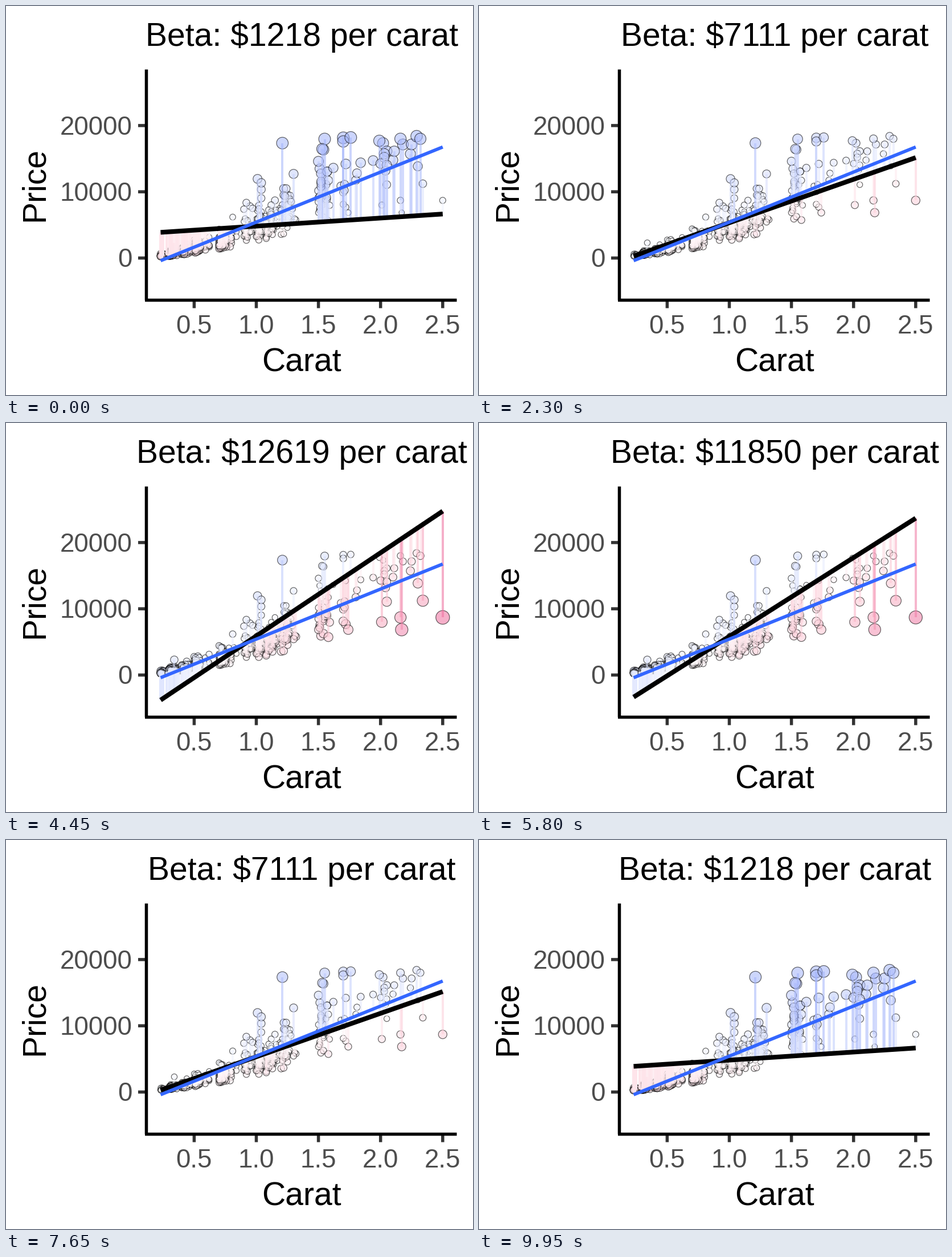
These frames come from a looping animation (820x683 px, 10 s). A matplotlib script:

```python
import matplotlib.pyplot as plt
import numpy as np
from matplotlib.animation import FuncAnimation
from matplotlib.collections import LineCollection
from matplotlib.colors import LinearSegmentedColormap

W, H, DPI = 820, 683, 64
PT = 72 / DPI                      # points per pixel
BIG, SMALL = 57.1, 45.7            # text heights in pixels
HALF = 100                         # frames in one sweep of the slope
BETA_MIN, BETA_STEP = 1218, 128.1
STATES = 20                        # slopes the chart actually shows
PIVOT = (0.905, 4700)
BEST = 7559
ENDS = np.array([0.23, 2.5])
COUNT = 760
REACH = 18000                      # residual with the strongest colour

plt.rcParams["font.family"] = "Liberation Sans"
shades = LinearSegmentedColormap.from_list(
    "residual", ["#ea5a92", "#fcbccb", "white", "#bcc9fc", "#7a92fa"])


def px(carat):
    return 221.3 + 218.2 * carat


def py(price):
    return 442.5 - 0.01163 * price


def predict(carat, beta):
    return PIVOT[1] + beta * (carat - PIVOT[0])


def make_data():
    """Stones bunch just above popular sizes; price grows as a power of size."""
    rng = np.random.default_rng(8)
    sizes = np.array([0.23, 0.3, 0.4, 0.5, 0.7, 0.9, 1.0, 1.1, 1.2, 1.5, 1.7, 2.0])
    share = np.array([6, 25, 11, 11, 14, 5, 11, 5, 4, 6.5, 1, 2.2])
    base = rng.choice(sizes, COUNT, p=share / share.sum())
    carat = base + rng.exponential(0.01 + 0.035 * base)
    carat = np.minimum(carat, base + 0.07 + 0.1 * base).round(2)
    factor = np.exp(rng.normal(0, 0.26, COUNT)).clip(0.56, 2.1)
    price = 4600 * carat ** 1.75 * factor
    price = np.where(price > 18000, rng.uniform(14500, 18000, COUNT), price)

    # stones that stand apart from the crowd
    apart = np.array([
        (0.34, 2300), (0.97, 7500), (1.01, 11950), (1.04, 11350), (1.21, 17350),
        (1.30, 12700), (1.50, 14600), (1.62, 13600), (1.70, 18150), (1.70, 17600),
        (1.74, 6850), (1.76, 18200), (1.81, 12800), (1.99, 17700), (2.01, 8000),
        (2.16, 18000), (2.16, 8700), (2.17, 6850), (2.25, 17150), (2.29, 18400),
        (2.32, 18000), (2.30, 13850), (2.34, 11220), (2.50, 8700)])
    return np.append(carat, apart[:, 0]), np.append(price, apart[:, 1])


def residual_colors(res, alpha):
    rgba = shades(0.5 + res / (2 * REACH))
    rgba[:, 3] = alpha
    return rgba


fig = plt.figure(figsize=(W / DPI, H / DPI), dpi=DPI, facecolor="white")
ax = fig.add_axes([0, 0, 1, 1])
ax.set_xlim(0, W)
ax.set_ylim(H, 0)
ax.axis("off")


def stroke(x, y, width, color, z):
    line, = ax.plot(x, y, color=color, lw=width * PT, zorder=z,
                    solid_capstyle="butt", snap=False)
    return line


def label(x, y, text, size, color="black", **kw):
    kw.setdefault("ha", "center")
    return ax.text(x, y, text, fontsize=size * PT, color=color, va="baseline", **kw)


# Axes, ticks and labels
stroke([246.5, 246.5], [111.5, 516.5], 5.5, "black", 1.5)
stroke([244, 791.5], [516.5, 516.5], 5.5, "black", 1.5)
for value in range(0, 20001, 10000):
    y = py(value)
    stroke([232, 246], [y, y], 5.5, "#333333", 1)
    label(221.5, y + 16, str(value), SMALL, "#4d4d4d", ha="right")
for value in np.arange(0.5, 2.6, 0.5):
    x = px(value)
    stroke([x, x], [517, 530.5], 5.5, "#333333", 1)
    label(x, 575, f"{value:.1f}", SMALL, "#4d4d4d")
label(519, 641, "Carat", BIG)
label(65.5, 313, "Price", BIG, rotation=90, rotation_mode="anchor")
title = label(519.5, 70, "", BIG)

# Data, residuals and the two lines
carat, price = make_data()
X, Y = px(carat), py(price)
dots = ax.scatter(X, Y, linewidths=1.2 * PT, zorder=2)
dots.set_edgecolor((0, 0, 0, 0.6))
sticks = LineCollection([], linewidths=4 * PT, capstyle="butt", zorder=3)
ax.add_collection(sticks)
guess = stroke(px(ENDS), py(predict(ENDS, 0)), 8.2, "black", 4)
stroke(px(ENDS), py(predict(ENDS, BEST)), 5.8, "#3366ff", 5)

STATE_GAP = BETA_STEP * (HALF - 1) / (STATES - 1)
state_frames = np.round(np.arange(STATES) * (HALF - 1) / (STATES - 1))


def draw(frame):
    step = min(frame, 2 * HALF - 1 - frame)
    title.set_text(f"Beta: ${round(BETA_MIN + BETA_STEP * step)} per carat")

    # the chart holds each slope until the next one is due
    state = np.searchsorted(state_frames, step, side="right") - 1
    beta = BETA_MIN + STATE_GAP * state
    fit = predict(carat, beta)
    res = price - fit
    sticks.set_segments(np.stack([np.column_stack([X, Y]),
                                  np.column_stack([X, py(fit)])], axis=1))
    sticks.set_color(residual_colors(res, 0.55))
    radius = 4.5 + 0.00047 * np.abs(res)
    dots.set_sizes((2 * radius * PT) ** 2)
    dots.set_facecolor(residual_colors(res, 0.55))
    guess.set_ydata(py(predict(ENDS, beta)))
    return title, sticks, dots, guess


anim = FuncAnimation(fig, draw, frames=2 * HALF, interval=50, repeat=True,
                     repeat_delay=0, blit=False)
plt.show()
```
